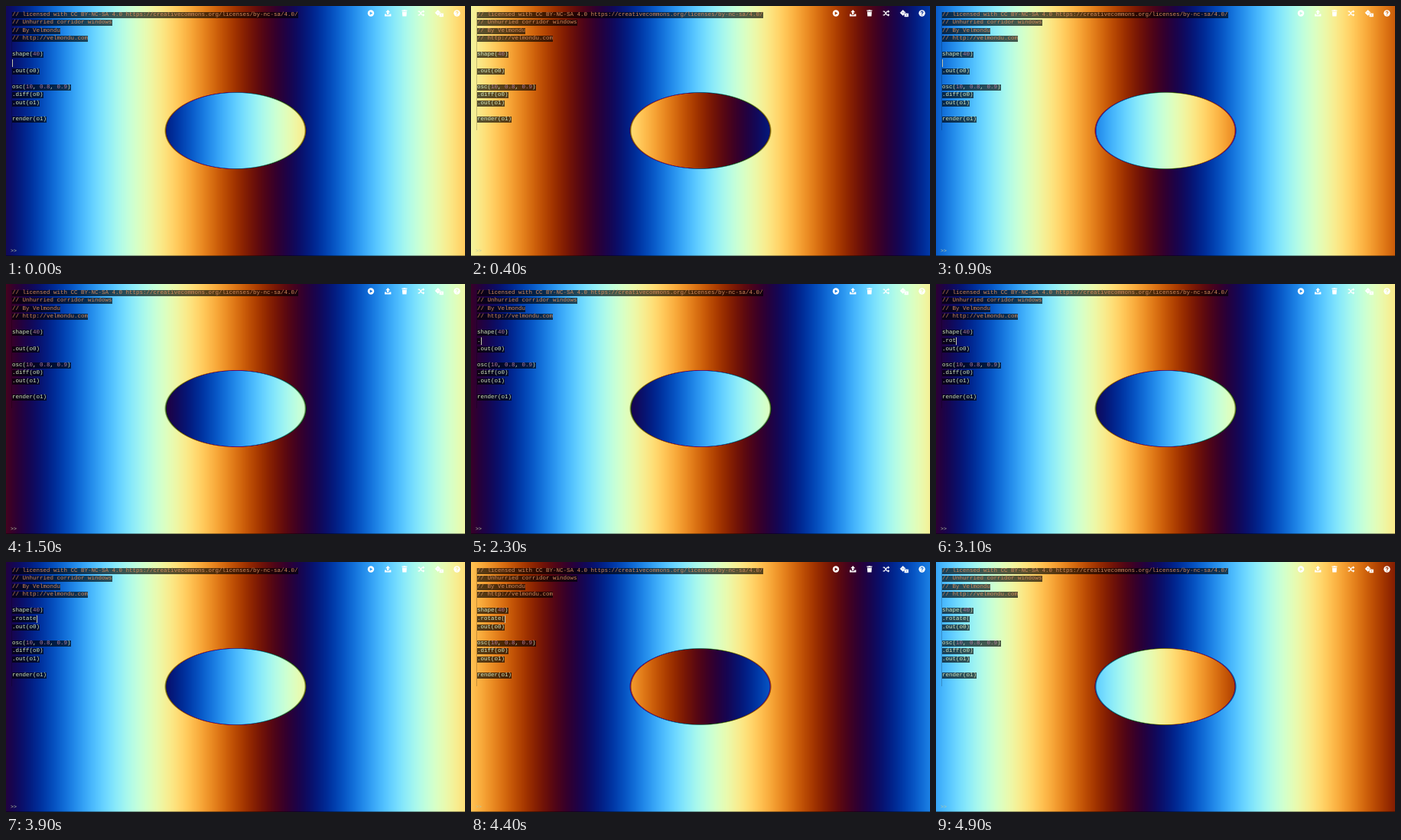
These frames come from a looping animation (600x328 px, 5000 ms). An HTML page with a canvas:

```html
<!DOCTYPE html>
<html lang="en">
<head>
<meta charset="utf-8">
<title>Live coding sketch</title>
<style>
html, body { margin: 0; width: 600px; height: 328px; overflow: hidden; background: #000; }
canvas, svg, pre, div { position: absolute; margin: 0; left: 0; top: 0; }
pre {
  font: 7.5px/10.54px "Liberation Mono", "Courier New", monospace;
  text-rendering: geometricPrecision;
  color: #d3e8c0;
}
#code { left: 8px; top: 6.7px; }
#code span { background: rgba(0, 0, 0, .65); }
#code i { font-style: normal; color: #d28a5c; }
#code b { font-weight: normal; color: #b07c9c; }
#prompt { left: 6px; top: 316.5px; font-size: 6.6px; color: #b9c9a4; }
#caret { top: 69.5px; width: 1px; height: 10.5px; background: #c4c8b0; }
#rule { left: 7px; top: 8px; width: 1px; height: 155px; background: rgba(0, 0, 0, .2); }
</style>
</head>
<body>
<canvas id="stage" width="600" height="328"></canvas>
<div id="rule"></div>
<pre id="code"><span><i>// licensed with CC BY-NC-SA 4.0 https://creativecommons.org/licenses/by-nc-sa/4.0/</i></span>
<span><i>// Unhurried corridor windows</i></span>
<span><i>// By Velmondu</i></span>
<span><i>// http://velmondu.com</i></span>

<span>shape(<b>40</b>)</span>
<span id="typed"></span>
<span>.out(o0)</span>

<span>osc(<b>10</b>, <b>0.8</b>, <b>0.9</b>)</span>
<span>.diff(o0)</span>
<span>.out(o1)</span>

<span>render(o1)</span></pre>
<div id="caret"></div>
<pre id="prompt">&gt;&gt;</pre>
<svg width="600" height="328" fill="#fff">
  <mask id="holes">
    <rect width="600" height="20"/>
    <rect x="557" width="17" height="20" fill="#fff"/>
    <circle cx="477" cy="9.5" r="4.2" fill="#fff"/>
    <circle cx="589.5" cy="9.5" r="4.2" fill="#fff"/>
    <path d="M475.7 7.3l3.6 2.2-3.6 2.2z" fill="#000"/>
    <path d="M588.1 8.4q0-1.4 1.4-1.4t1.4 1.2q0 .9-1.4 1.6v.5M589.5 11.2v1.1" fill="none" stroke="#000" stroke-width="1.1"/>
    <path d="M566.2 9.3h6" stroke="#000" stroke-width=".6"/>
    <circle cx="564.6" cy="8.8" r=".5" fill="#000"/>
    <circle cx="569.4" cy="11.8" r=".6" fill="#000"/>
  </mask>
  <g mask="url(#holes)">
    <circle cx="477" cy="9.5" r="4.2"/>
    <circle cx="589.5" cy="9.5" r="4.2"/>
    <path d="M564.6 5.2l3.7 3.7-3.7 3.7-3.7-3.7zM566.8 9.6h4.8v4.4h-4.8z" stroke="#fff" stroke-width=".5" stroke-linejoin="round"/>
  </g>
  <path d="M499.2 5l3 3.2h-1.9v2.7h-2.2V8.2h-1.9zM495 10.6h2.2v1.1h4v-1.1h2.2v2.8H495z"/>
  <path d="M517.4 5.6h2l.5-.6h2l.5.6h2v1.2h-7zM517.9 7.4h6l-.4 6.2h-5.2z"/>
  <path d="M538.6 7.2h1.7l3.8 4.6h1.6M538.6 11.8h1.7l3.8-4.6h1.6" fill="none" stroke="#fff" stroke-width="1.2"/>
  <path d="M545 5.3l2.3 1.9-2.3 1.9zM545 9.9l2.3 1.9-2.3 1.9z"/>
</svg>
<script>
const W = 600, H = 328, LOOP = 5000, STEP = 100;
const DARK_X = 355;      // darkest column at time zero
const CHAR = 4.5, BLINK = 530;
const WORD = ".rotate(";
const KEYS = [2000, 2600, 2800, 3000, 3300, 3450, 3600, 4300];

const ctx = document.getElementById("stage").getContext("2d");
const typed = document.getElementById("typed");
const caret = document.getElementById("caret");

// Soft-edged white disc, stretched to the stage
const disc = ctx.createRadialGradient(0, 0, 0, 0, 0, .32);
disc.addColorStop(.3 / .32, "#fff");
disc.addColorStop(.31 / .32, "#000");

const wave = a => Math.round(127.5 + 127.5 * Math.sin(a));

function drawOsc(t) {
  for (let x = 0; x < W; x++) {
    const a = 10 * (x + .5 - DARK_X) / W + 8 * t / 1000 - Math.PI / 2;
    ctx.fillStyle = `rgb(${wave(a - .9)},${wave(a)},${wave(a + .9)})`;
    ctx.fillRect(x, 0, 1, H);
  }
}

function drawDisc() {
  ctx.save();
  ctx.globalCompositeOperation = "difference";
  ctx.translate(W / 2, 163.5);
  ctx.scale(W / 2, H / 2);
  ctx.fillStyle = disc;
  ctx.fillRect(-.32, -.32, .64, .64);
  ctx.restore();
}

function drawTyping(t) {
  const n = KEYS.filter(k => k <= t).length;
  const since = n ? t - KEYS[n - 1] : t + 310;
  typed.textContent = WORD.slice(0, n);
  caret.style.left = 8 + CHAR * n + "px";
  caret.style.opacity = since % (2 * BLINK) < BLINK ? 1 : 0;
}

function frame() {
  const t = Math.floor(performance.now() % LOOP / STEP) * STEP;
  drawOsc(t);
  drawDisc();
  ctx.fillStyle = "rgba(0,0,0,.4)";
  ctx.fillRect(0, H - 1, W, 1);
  drawTyping(t);
  requestAnimationFrame(frame);
}
frame();
</script>
</body>
</html>
```
